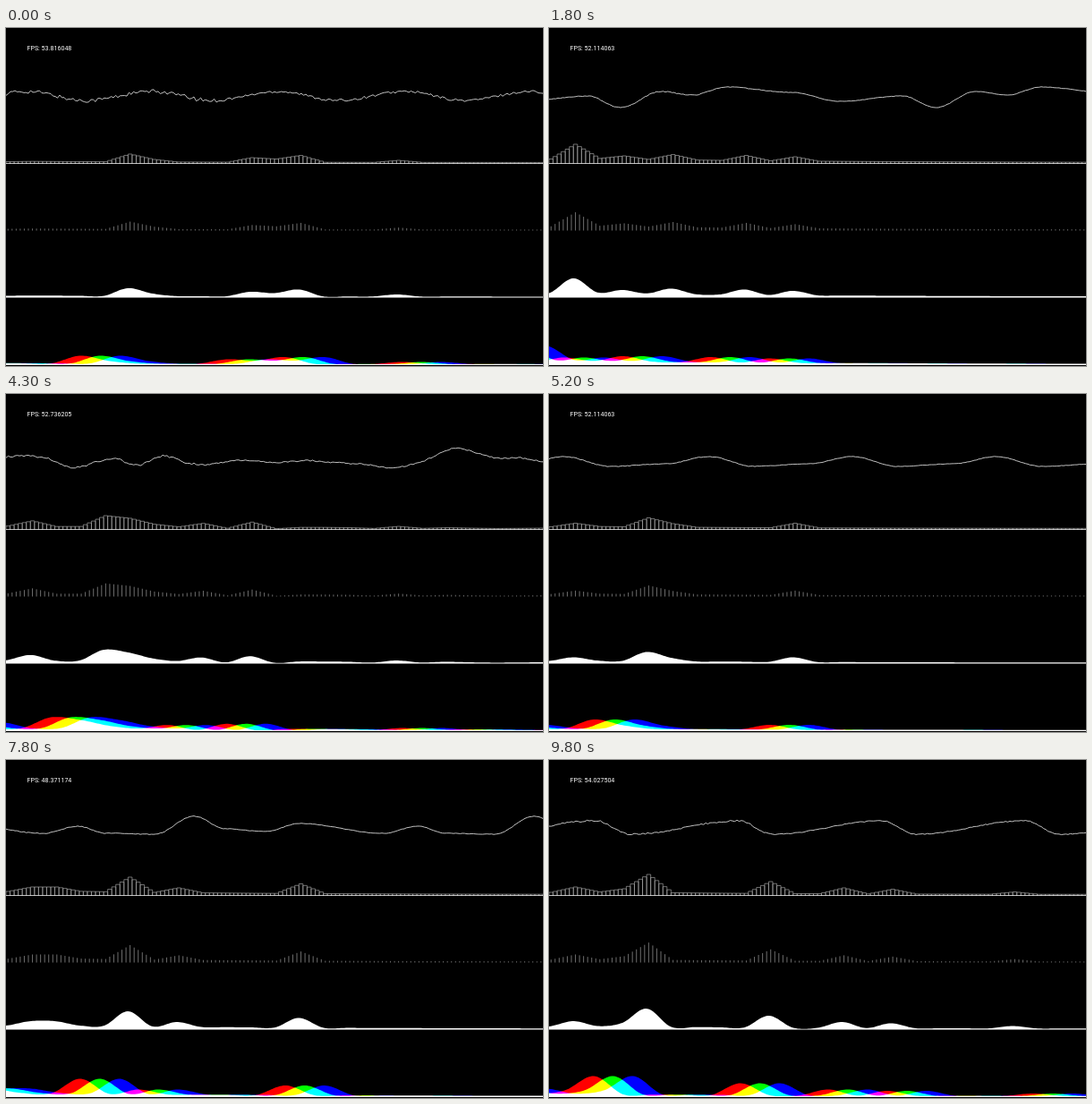
These frames come from a looping animation (600x378 px, 9.9 s). An HTML page:

```html
<!DOCTYPE html>
<html lang="en">
<head>
<meta charset="utf-8">
<title>Audio spectrum</title>
<style>
  html, body { margin: 0; width: 100%; height: 100%; overflow: hidden; background: #000; }
  svg { display: block; width: 600px; height: 378px; background: #000; }
  text { font: 7.1px Roboto, Arial, sans-serif; fill: #fff; }
  .thin { fill: none; stroke: #fff; stroke-width: .75; }
  .dim { stroke: #aaa; stroke-width: .65; }
  .mix { isolation: isolate; }
  .mix path { mix-blend-mode: screen; }
</style>
</head>
<body>
<svg viewBox="0 0 600 378">
  <text id="fps" x="23.5" y="25"></text>
  <path id="wave" class="thin"/>
  <path id="bars" class="thin dim"/>
  <path class="thin" d="M0 151.5H600"/>
  <path id="ticks" class="thin dim"/>
  <path id="hill" fill="#fff"/>
  <g class="mix">
    <rect y="376" width="600" height="1" fill="#fff"/>
    <path id="red" fill="#f00"/>
    <path id="green" fill="#0f0"/>
    <path id="blue" fill="#00f"/>
  </g>
</svg>
<script>
const LOOP = 9900, STEP = 100, W = 600, DX = 2.5;
const BARS = 132, GAP = W / BARS, PER_NODE = 6, NODE = GAP * PER_NODE, BANDS = 23;
const $ = id => document.getElementById(id);

// bass: level of the falling floor; peaks: [band, height];
// turns: crests and troughs [x, height] of a motif repeated every period.
const poses = [
  { t: 0, rough: 2, bass: 2, peaks: [[5, 10.5], [6, 4.5], [10, 6.5], [11, 5], [12, 9], [16, 3.5]],
    period: 141, turns: [[24, 6], [88, -4]] },
  { t: 1800, rough: .4, bass: 8, peaks: [[1, 21.5], [3, 8.5], [5, 10], [8, 9], [10, 7.5]],
    period: 352, turns: [[80, -12], [125, 6], [160, 2], [198, 11], [270, 5], [325, -5], [395, 1]] },
  { t: 3400, rough: 1.5, bass: 5, peaks: [[1, 13.5], [4, 11], [5, 20], [6, 9], [8, 9], [10, 10.5], [16, 5]],
    period: 600, turns: [[25, 4], [92, -2], [122, 4], [145, -3], [200, 3], [350, -3], [395, 3], [437, -8], [515, 12]] },
  { t: 5200, rough: .4, bass: 4, peaks: [[1, 7], [4, 13], [5, 6.5], [10, 7]],
    period: 161, turns: [[17, 7], [68, -4], [130, -1]] },
  { t: 6700, rough: 1, bass: 4, peaks: [[2, 8], [6, 19], [7, 27], [9, 9], [14, 14], [15, 19], [19, 6], [22, 11.5]],
    period: 101.5, turns: [[38, 15], [56, -9], [80, 3], [103, -5]] },
  { t: 7800, rough: .4, bass: 7, peaks: [[1, 9.5], [2, 9.5], [5, 20.5], [7, 8.5], [12, 13]],
    period: 380, turns: [[42, -5], [80, 3], [112, -5], [166, -6], [210, 14], [245, 0], [290, -3], [328, 6]] },
  { t: 9800, rough: .8, bass: 5, peaks: [[1, 9.5], [3, 7.5], [4, 23.5], [9, 15.5], [12, 8.5], [14, 7], [19, 4]],
    period: 160, turns: [[52, 9], [90, -6]] }
];
const rates = ['53.816048', '53.209412', '52.114063', '51.808407', '52.736205',
  '52.114063', '54.318726', '55.610725', '48.371174', '54.027504'];

const clamp = (v, lo, hi) => Math.min(hi, Math.max(lo, v));
const mix = (a, b, u) => a + (b - a) * u;

// Repeatable noise in -1..1
function noise(a, b) {
  const s = Math.sin(a * 127.1 + b * 311.7) * 43758.5453;
  return (s - Math.floor(s)) * 2 - 1;
}

function drift(a, time) {
  const i = Math.floor(time);
  return mix(noise(a, i), noise(a, i + 1), time - i);
}

const at = (list, i) => list[clamp(i, 0, list.length - 1)];

function linear(list, p) {
  const i = Math.floor(p);
  return mix(at(list, i), at(list, i + 1), p - i);
}

function smooth(list, p) {
  const i = Math.floor(p), f = p - i;
  const a = at(list, i - 1), b = at(list, i), c = at(list, i + 1), d = at(list, i + 2);
  return b + f / 2 * (c - a + f * (2 * a - 5 * b + 4 * c - d + f * (3 * (b - c) + d - a)));
}

function spectrum({ bass, peaks }) {
  const list = Array.from({ length: BANDS }, (_, k) => 1 + bass * Math.exp(-k / 8) * (k ? .75 : .5));
  for (const [k, h] of peaks) list[k] = h;
  return list;
}

// Eased height between the two turns around x
function waveAt({ turns, period }, x) {
  const n = turns.length, first = turns[0][0];
  const p = first + ((x - first) % period + period) % period;
  let i = n - 1;
  while (turns[i][0] > p) i--;
  const [x0, y0] = turns[i];
  const [x1, y1] = i < n - 1 ? turns[i + 1] : [first + period, turns[0][1]];
  return mix(y0, y1, (1 - Math.cos(Math.PI * (p - x0) / (x1 - x0))) / 2);
}

for (const p of poses) p.band = spectrum(p);

function poseAt(t) {
  let i = 0;
  while (i < poses.length - 2 && t >= poses[i + 1].t) i++;
  const a = poses[i], b = poses[i + 1];
  const u = (t - a.t) / (b.t - a.t), step = t / STEP;
  const loose = Math.sin(Math.PI * u);
  const ka = Math.cos(u * Math.PI / 2), kb = Math.sin(u * Math.PI / 2);
  const rough = mix(a.rough, b.rough, u);
  return {
    wave: x => waveAt(a, x) * ka + waveAt(b, x) * kb
      + 4 * loose * drift(step, x / 25) + rough * noise(x / DX, step) * (x > 250 ? .7 : 1.1),
    band: a.band.map((v, k) => mix(v, b.band[k], u) * (1 + .55 * loose * drift(k + 50, step / 2.5)))
  };
}

const pt = (x, y) => x.toFixed(2) + ' ' + y.toFixed(2);

function curve(dx, y) {
  const pts = [];
  for (let x = 0; x <= W; x += dx) pts.push(pt(x, y(x)));
  return pts.join('L');
}

// Filled curve; x runs from an offset at a given scale
function hillPath(band, base, start, scale) {
  const y = x => base - Math.max(.5, smooth(band, (x - start) / scale / NODE));
  return `M0 ${base}L${curve(2, y)}L${W} ${base}Z`;
}

function draw(t) {
  const time = Math.floor(t / STEP) * STEP;
  const { wave, band } = poseAt(time);
  let bars = 'M0 151.5', ticks = '';
  for (let i = 0; i < BARS; i++) {
    const x = i * GAP, h = Math.max(.5, linear(band, i / PER_NODE));
    bars += `L${pt(x, 151.5 - h)}h${GAP}V151.5`;
    ticks += `M${pt(x + GAP / 2, 226.5)}v${-Math.max(.7, h * .95)}`;
  }
  const paths = {
    wave: 'M' + curve(DX, x => 77 - wave(x)),
    bars, ticks,
    hill: hillPath(band, 301.5, 0, 1)
  };
  ['blue', 'green', 'red'].forEach((id, k) => {
    paths[id] = hillPath(band, 377, -37 - k * 21.8, 1.2);
  });
  for (const id in paths) $(id).setAttribute('d', paths[id]);
  $('fps').textContent = 'FPS: ' + rates[Math.min(9, Math.floor((time + 500) / 1000))];
}

const begin = performance.now();
function tick() {
  draw((performance.now() - begin) % LOOP);
  requestAnimationFrame(tick);
}
tick();
</script>
</body>
</html>
```
